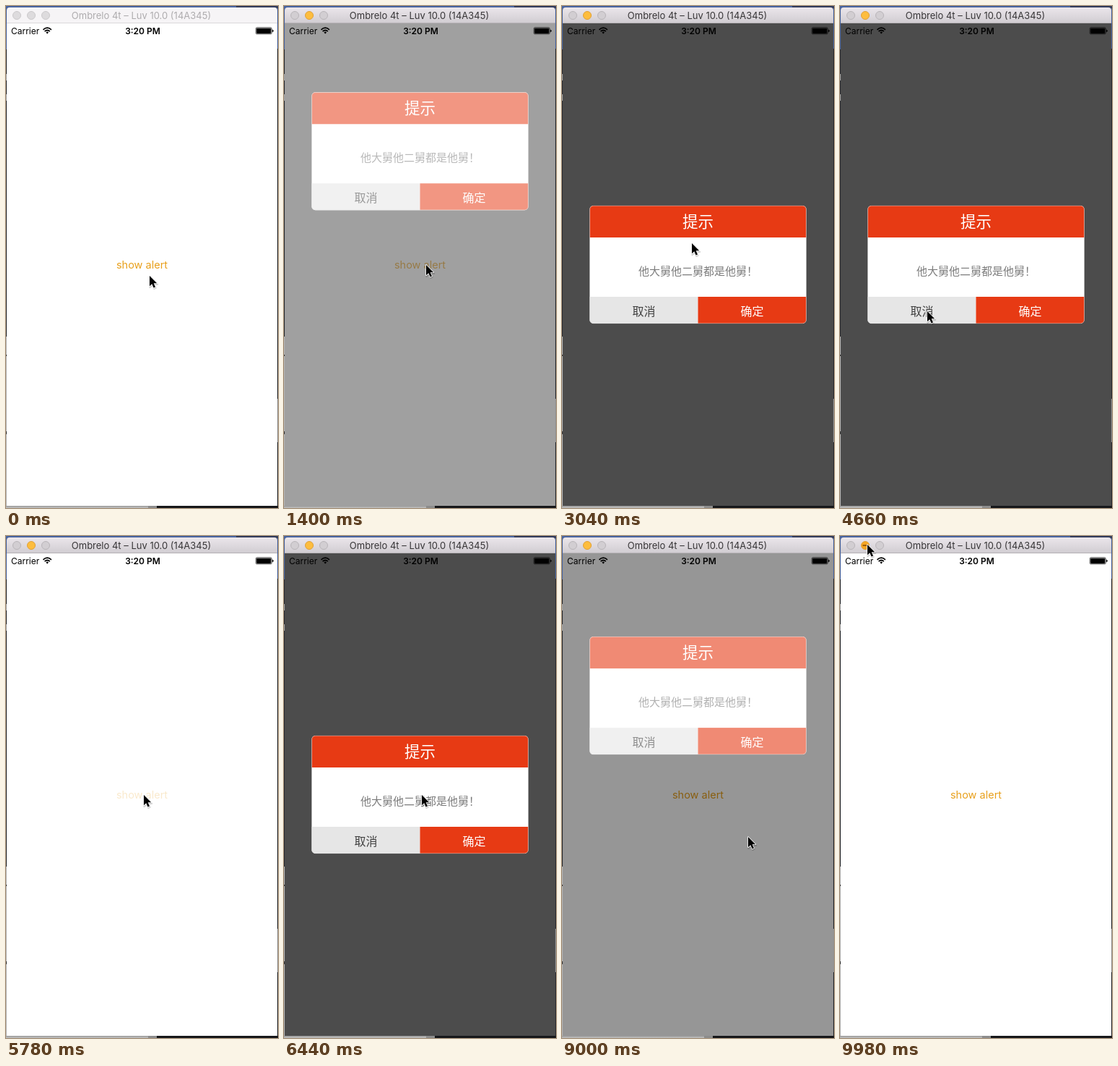
Write an HTML page that moves like this. It is 377 px wide and 694 px high and loops after 10000 ms.

```html
<!DOCTYPE html>
<html lang="zh-CN">
<head>
<meta charset="utf-8">
<title>Alert demo</title>
<style>
html, body { margin: 0; width: 100%; height: 100%; overflow: hidden; background: #fff; }
svg { display: block; width: 377px; height: 694px; }
text { font-family: Inter, Roboto, sans-serif; text-anchor: middle; }
.zh { font-family: "Noto Sans CJK SC", "Noto Sans CJK", "Noto Sans CJK JP", sans-serif; }
</style>
</head>
<body>
<svg viewBox="0 0 377 694" xmlns="http://www.w3.org/2000/svg">
  <defs>
    <linearGradient id="barOn" x1="0" y1="0" x2="0" y2="1">
      <stop offset="0" stop-color="#ebe6eb"/><stop offset="1" stop-color="#d0ccd1"/>
    </linearGradient>
    <linearGradient id="shade" x1="0" y1="0" x2="0" y2="1">
      <stop offset="0" stop-color="#969696"/><stop offset="1" stop-color="#c4c4c4"/>
    </linearGradient>
    <clipPath id="round"><rect x="38.5" width="300" height="163" rx="5"/></clipPath>
    <clipPath id="screen"><rect x="1" y="24" width="375" height="667"/></clipPath>
  </defs>

  <!-- desktop behind the window -->
  <rect width="377" height="694" fill="#24262b"/>
  <rect width="319" height="4" fill="#4864a0"/>
  <rect x="319" width="58" height="4" fill="#323c5c"/>
  <rect y="0" width="1" height="60" fill="#45629e"/>
  <rect x="376" y="3" width="1" height="56" fill="#45629e"/>
  <rect y="94" width="1" height="9" fill="#a0a0a0"/>
  <rect y="122" width="1" height="9" fill="#a0a0a0"/>
  <rect y="457" width="1" height="237" fill="#b4b4b4"/>
  <rect y="482" width="1" height="2" fill="#333"/>
  <rect y="588" width="1" height="4" fill="#333"/>
  <rect x="376" y="543" width="1" height="60" fill="#909090"/>
  <rect y="691" width="197" height="3" fill="url(#shade)"/>
  <rect x="197" y="691" width="12" height="3" fill="#8c8c8c"/>
  <rect x="209" y="691" width="168" height="3" fill="#16171a"/>

  <!-- window -->
  <path id="bar" d="M1 24V6a4 4 0 0 1 4-4H372a4 4 0 0 1 4 4V24z"/>
  <rect id="edge" x="1" y="23" width="375" height="1"/>
  <g id="lights" stroke-width="1">
    <circle cx="15" cy="13" r="5.5"/><circle cx="35" cy="13" r="5.5"/><circle cx="55" cy="13" r="5.5"/>
  </g>
  <path id="minus" d="M31.5 13H38.5" stroke="#8a4a00" stroke-width="1.6"/>
  <text id="title" x="187.5" y="18" font-size="13">Ombrelo 4t – Luv 10.0 (14A345)</text>
  <rect x="1" y="24" width="375" height="667" fill="#fff"/>

  <!-- status bar -->
  <text x="7" y="38.5" font-size="12" style="text-anchor:start">Carrier</text>
  <g fill="none" stroke="#000" stroke-width="1.7">
    <path d="M51.5 32.8Q57.2 27.6 62.9 32.8M53.6 35.2Q57.2 31.8 60.8 35.2"/>
    <path d="M55.4 36.4Q57.2 34.8 59 36.4L57.2 38.4z" fill="#000" stroke="none"/>
  </g>
  <text x="189.5" y="38.5" font-size="12" font-weight="600">3:20 PM</text>
  <rect x="346.3" y="29.8" width="22" height="9" rx="1.6" fill="#fff" stroke="#000" stroke-width=".7"/>
  <rect x="347.2" y="30.7" width="20.2" height="7.2" rx=".8"/>
  <path d="M369.2 32.4q1.6 .5 1.6 1.9t-1.6 1.9z"/>

  <text id="show" x="188.5" y="363" font-size="14.5" fill="#e8a01c">show alert</text>

  <!-- dimmed overlay with dialog -->
  <g clip-path="url(#screen)">
    <g id="overlay">
      <rect x="1" y="24" width="375" height="667" fill="#000" fill-opacity=".7"/>
      <g id="dialog">
        <rect x="38.5" width="300" height="163" rx="5" fill="#fff"/>
        <g clip-path="url(#round)">
          <rect x="38" width="301" height="44" fill="#e73a14"/>
          <rect x="38" y="126" width="150.5" height="37" fill="#e6e6e6"/>
          <rect x="188.5" y="126" width="150.5" height="37" fill="#e73a14"/>
        </g>
        <rect x="38.5" y=".3" width="300" height="162.4" rx="5" fill="none" stroke="#d8d8d8" stroke-opacity=".6" stroke-width=".8"/>
        <text class="zh" x="188.5" y="30" font-size="21.5" fill="#fff">提示</text>
        <text class="zh" x="188.5" y="96" font-size="15" fill="#7c7c7c">他大舅他二舅都是他舅！</text>
        <text class="zh" x="113.5" y="151.5" font-size="16" fill="#404040">取消</text>
        <text class="zh" x="263.5" y="151.5" font-size="16" fill="#fff">确定</text>
      </g>
    </g>
  </g>

  <g id="cursor" stroke-linejoin="round">
    <path d="M.4 .9V16.2L3.9 12.9 6.2 18 8.7 16.9 6.5 11.9H11.2z" fill="#000" stroke="#000" stroke-width="2" opacity=".16"/>
    <path d="M0 0V14.3L3.3 11.2 5.6 16.6 8 15.6 5.7 10.3H10.2z" fill="#000" stroke="#fff" stroke-width="1.6" paint-order="stroke"/>
  </g>
</svg>
<script>
const LOOP = 10000, STEP = 20, MOVE = 500;
const ACTIVATE = 700, HOVER = 9800;
const TOP = -57.5, REST = 276;
const taps = [{ down: 1040, up: 1140 }, { down: 5700, up: 5820 }];
const shows = [{ open: 1140, close: 4860 }, { open: 5820, close: 8780 }];

// time, x, y of the pointer tip
const path = [
  [0, 199, 373], [200, 199, 373], [640, 197, 358], [2300, 197, 358],
  [2900, 180, 328], [3200, 180, 328], [4000, 121, 422], [5100, 121, 422],
  [5600, 191, 358], [6700, 191, 358], [7500, 258, 416], [9000, 258, 416],
  [9900, 38, 12], [LOOP, 38, 12]
];

const $ = id => document.getElementById(id);
const clamp = v => Math.max(0, Math.min(1, v));
const ease = v => { v = clamp(v); return v * v * (3 - 2 * v); };
const set = (el, attrs) => { for (const k in attrs) el.setAttribute(k, attrs[k]); };
const lights = [...$('lights').children];

function pointer(t) {
  let i = 1;
  while (i < path.length - 1 && t > path[i][0]) i++;
  const [t0, x0, y0] = path[i - 1], [t1, x1, y1] = path[i];
  const k = ease((t - t0) / (t1 - t0));
  return [x0 + (x1 - x0) * k, y0 + (y1 - y0) * k];
}

function buttonAlpha(t) {
  for (const { down, up } of taps) {
    if (t >= down && t < up) return .22;
    if (t >= up && t < up + MOVE) return .22 + .78 * (t - up) / MOVE;
  }
  return 1;
}

function shown(t) {
  return shows.reduce((p, s) =>
    p + ease((t - s.open) / MOVE) - ease((t - s.close) / MOVE), 0);
}

function draw(t) {
  const on = t >= ACTIVATE, hover = t >= HOVER;
  set($('bar'), { fill: on ? 'url(#barOn)' : '#f6f4f6' });
  set($('edge'), { fill: on ? '#b5b1b5' : '#dad8da' });
  set($('title'), { fill: on ? '#383638' : '#aeacae' });
  lights.forEach((el, i) => {
    const amber = on && i === 1;
    set(el, {
      fill: amber ? (hover ? '#f5a623' : '#fdbd3e') : on ? '#d2ced2' : '#dddbdd',
      stroke: amber ? '#e0a036' : on ? '#b9b5b9' : '#cbc9cb'
    });
  });
  set($('minus'), { opacity: hover ? 1 : 0 });
  set($('show'), { opacity: buttonAlpha(t) });

  const p = shown(t);
  set($('overlay'), { opacity: p });
  set($('dialog'), { transform: `translate(0 ${TOP + (REST - TOP) * p})` });
  set($('cursor'), { transform: `translate(${pointer(t).map(Math.round).join(' ')})` });
}

const start = performance.now();
function tick(now) {
  const t = Math.max(0, now - start) % LOOP;
  draw(Math.floor(t / STEP) * STEP);
  requestAnimationFrame(tick);
}
draw(0);
requestAnimationFrame(tick);
</script>
</body>
</html>
```
